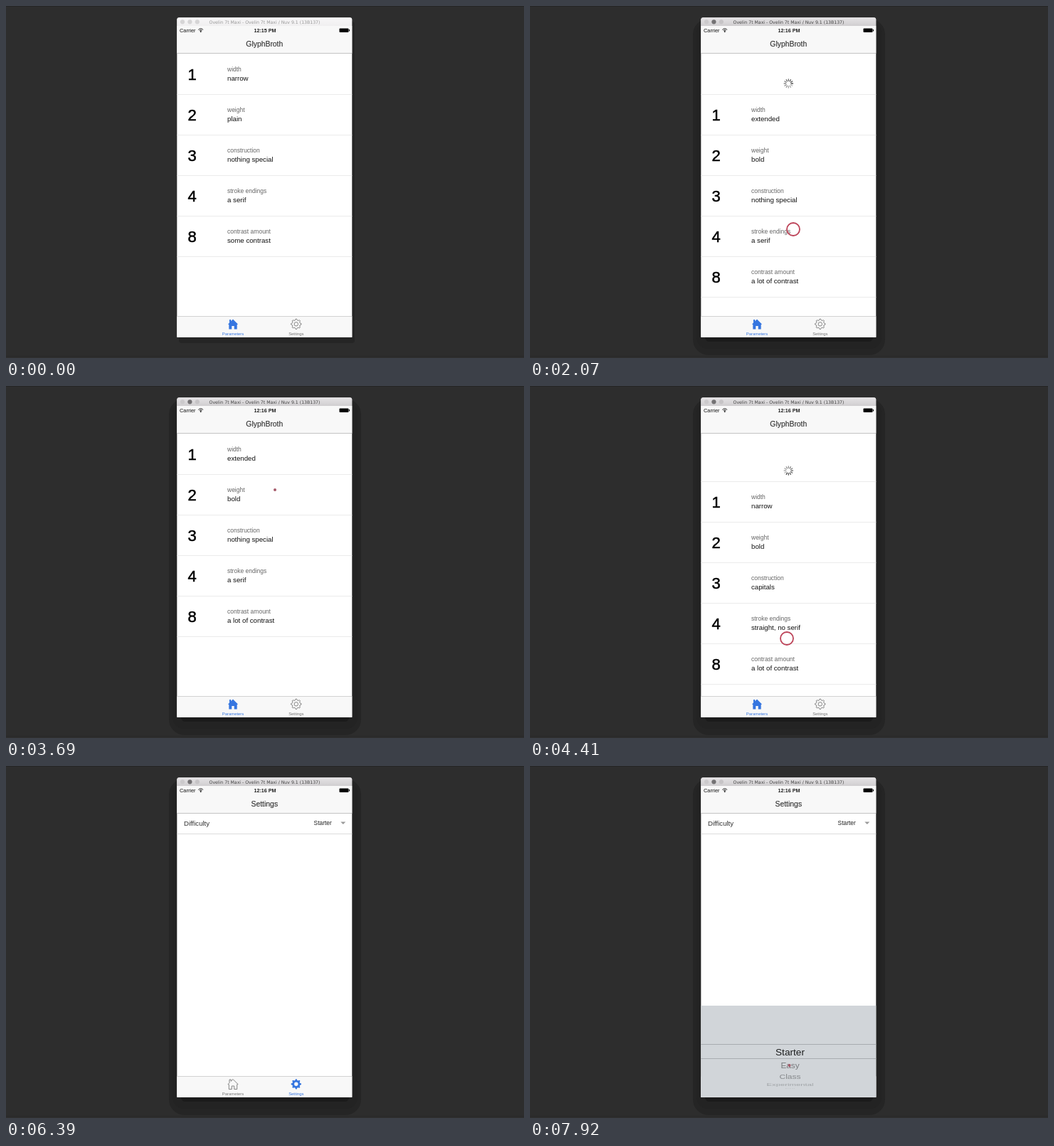
An HTML page with a canvas that plays this animation: 728 px wide and 495 px high, repeating every 8000 ms.

```html
<!DOCTYPE html>
<html lang="en">
<head>
<meta charset="utf-8">
<title>Type parameters app</title>
<style>
html, body { margin: 0; width: 100%; height: 100%; overflow: hidden; background: #2d2d2d; }
canvas { display: block; width: 728px; height: 495px; }
</style>
</head>
<body>
<canvas id="stage" width="728" height="495"></canvas>
<script>
const ctx = document.getElementById('stage').getContext('2d');
const LOOP = 8000, STEP = 90;
const SANS = '"Liberation Sans", Arial, sans-serif';
const BLUE = '#3676e0', GREY = '#777', RULE = '#ebebeb';
const WIN = { x: 240.3, y: 16.3, w: 246, h: 449.4 };
const DEVICE = 'Ovelin 7t Maxi';
const APP = 'GlyphBroth';

const NUMBERS = [1, 2, 3, 4, 8];
const LABELS = ['width', 'weight', 'construction', 'stroke endings', 'contrast amount'];
const RECIPES = [
  ['narrow', 'plain', 'nothing special', 'a serif', 'some contrast'],
  ['extended', 'bold', 'nothing special', 'a serif', 'a lot of contrast'],
  ['narrow', 'bold', 'capitals', 'straight, no serif', 'a lot of contrast']
];

// A pull drags in two moves with a rest between them, then lets go.
const PULLS = [
  { down: 1080, rest: 1620, resume: 1710, up: 2070, back: 2613, from: [354, 135], mid: [366, 268], to: [370, 314] },
  { down: 3600, rest: 3960, resume: 4140, up: 4410, back: 4915, from: [378, 146], mid: [370, 296], to: [361, 355] }
];
const TAPS = [
  { down: 5580, up: 5850, at: [408, 452] },
  { down: 6750, up: 6930, at: [450, 76] }
];
const ACTIVATE = 270, SETTINGS = 5850, PICKER = 6980, LAST_PRESS = 7830;
const HOLD = 36;

const clamp = v => Math.min(1, Math.max(0, v));
const lerp = (a, b, p) => a + (b - a) * p;
const span = (t, a, b) => clamp((t - a) / (b - a));
const easeOut = p => 1 - (1 - p) ** 3;
const easeInOut = p => p * p * (3 - 2 * p);

function rect(x, y, w, h, color) {
  ctx.fillStyle = color;
  ctx.fillRect(x, y, w, h);
}

function round(x, y, w, h, r, color) {
  ctx.fillStyle = color;
  ctx.beginPath();
  ctx.roundRect(x, y, w, h, r);
  ctx.fill();
}

function disc(x, y, r, color) {
  ctx.fillStyle = color;
  ctx.beginPath();
  ctx.arc(x, y, r, 0, Math.PI * 2);
  ctx.fill();
}

function text(s, x, y, size, color, { align = 'left', weight = 'normal', stroke = 0, font = SANS } = {}) {
  ctx.font = `${weight} ${size}px ${font}`;
  ctx.textAlign = align;
  ctx.fillStyle = color;
  ctx.fillText(s, x, y);
  if (stroke) {
    ctx.strokeStyle = color;
    ctx.lineWidth = stroke;
    ctx.strokeText(s, x, y);
  }
}

function dragPoint(p, t) {
  const a = easeInOut(span(t, p.down + STEP, p.rest));
  const b = easeInOut(span(t, p.resume, p.up));
  return [0, 1].map(i => lerp(lerp(p.from[i], p.mid[i], a), p.to[i], b));
}

function listOffset(t) {
  for (const p of PULLS) {
    if (t < p.down || t > p.back + 250) continue;
    const drag = Math.max(0, (dragPoint(p, t)[1] - p.from[1] - 8) / 3);
    const held = lerp(drag, HOLD, easeOut(span(t, p.up, p.up + 250)));
    return held * (1 - easeOut(span(t, p.back, p.back + 250)));
  }
  return 0;
}

function drawBackdrop(active) {
  rect(0, 0, 728, 495, '#2d2d2d');
  rect(0, 0, 728, 1, '#242424');
  rect(0, 492, 728, 1, '#282828');
  if (active) {
    round(229, 18, 270, 473, 22, '#252525');
    round(234, 22, 260, 460, 16, '#232323');
    round(246, 440, 236, 32, 6, '#1b1b1b');
  } else {
    round(243, 22, 247, 452, 4, '#252525');
  }
}

function drawTitleBar(active) {
  const g = ctx.createLinearGradient(0, 16, 0, 28);
  g.addColorStop(0, active ? '#e6e4e6' : '#f8f7f8');
  g.addColorStop(1, active ? '#d0ced0' : '#f0eff0');
  rect(WIN.x, WIN.y, WIN.w, 12, g);
  const dots = active ? ['#cbc9cb', '#747274', '#c6c4c6'] : ['#d6d5d6', '#d6d5d6', '#d6d5d6'];
  dots.forEach((c, i) => disc(248 + 10.4 * i, 22.3, 3.1, c));
  text(`${DEVICE} - ${DEVICE} / Nuv 9.1 (13B137)`, 363.5, 24.8, 6.2, active ? '#444' : '#999',
    { align: 'center', font: '"DejaVu Sans", sans-serif' });
}

function drawHeader(title, active) {
  rect(240, 28, 247, 38, '#f8f8f8');
  rect(240, 66, 247, 1, '#c4c4c4');
  text('Carrier', 244, 36.8, 7.4, '#111');
  ctx.strokeStyle = '#111';
  ctx.lineWidth = 1;
  for (const r of [2.4, 4.5]) {
    ctx.beginPath();
    ctx.arc(273.7, 36.4, r, -Math.PI * .77, -Math.PI * .23);
    ctx.stroke();
  }
  disc(273.7, 36, .9, '#111');
  text(active ? '12:16 PM' : '12:15 PM', 364, 36.9, 7.2, '#222', { align: 'center', weight: 'bold' });
  round(468.5, 31.5, 13, 5.6, 1, '#000');
  rect(482, 33, 1, 2.5, '#000');
  text(title, 363.3, 57, 10.4, '#333', { align: 'center', stroke: .15 });
}

function drawSpinner(x, y, t) {
  const head = Math.floor(t / 1000 * 12);
  ctx.lineWidth = 1.3;
  ctx.lineCap = 'round';
  for (let i = 0; i < 12; i++) {
    const a = i * Math.PI / 6, age = ((head - i) % 12 + 12) % 12;
    ctx.strokeStyle = `rgba(70,70,70,${.95 - age * .05})`;
    ctx.beginPath();
    ctx.moveTo(x + Math.cos(a) * 3.6, y + Math.sin(a) * 3.6);
    ctx.lineTo(x + Math.cos(a) * 6.2, y + Math.sin(a) * 6.2);
    ctx.stroke();
  }
  ctx.lineCap = 'butt';
}

function drawList(t) {
  const off = Math.round(listOffset(t));
  const recipe = RECIPES[PULLS.filter(p => t >= p.up).length];
  if (PULLS.some(p => t >= p.up && t < p.back)) drawSpinner(363.3, off + 52, t);
  for (let i = 0; i <= 5; i++) {
    const y = 67 + off + 57 * i;
    if (i || off) rect(240, y, 247, 1, RULE);
    if (i === 5) break;
    text(NUMBERS[i], 255.5, y + 36.6, 22, '#000', { stroke: .5 });
    text(LABELS[i], 311, y + 24.7, 8.5, '#666');
    text(recipe[i], 311, y + 37.6, 9.7, '#111');
  }
}

function drawSettings() {
  text('Difficulty', 250, 84.2, 9.6, '#333');
  text('Starter', 432.6, 83.4, 8.4, '#222');
  ctx.fillStyle = '#999';
  ctx.beginPath();
  ctx.moveTo(470.3, 78.4);
  ctx.lineTo(477.3, 78.4);
  ctx.lineTo(473.8, 82);
  ctx.fill();
  rect(240, 95, 247, 1, '#dcdcdc');
}

function drawHome(x, y, on) {
  ctx.beginPath();
  [[0, -7], [7, 0], [5.7, .4], [5.7, 7], [1.7, 7], [1.7, 2.5], [-1.7, 2.5], [-1.7, 7],
    [-5.7, 7], [-5.7, .4], [-7, 0], [-5, -2], [-5, -6.5], [-2.8, -6.5], [-2.8, -4.2]]
    .forEach(([a, b]) => ctx.lineTo(x + a, y + b));
  ctx.closePath();
  paintIcon(on);
}

function drawGear(x, y, on) {
  ctx.beginPath();
  for (let i = 0; i < 32; i++) {
    const r = i % 4 < 2 ? 7.2 : 5.5, a = (i - .5) * Math.PI / 16;
    ctx.lineTo(x + Math.cos(a) * r, y + Math.sin(a) * r);
  }
  ctx.closePath();
  ctx.moveTo(x + 2.7, y);
  ctx.arc(x, y, 2.7, 0, Math.PI * 2);
  paintIcon(on);
}

function paintIcon(on) {
  ctx.fillStyle = BLUE;
  ctx.strokeStyle = GREY;
  ctx.lineWidth = .9;
  if (on) ctx.fill('evenodd');
  else ctx.stroke();
}

function drawTabs(settings) {
  rect(240, 437, 247, 29, '#f8f8f8');
  rect(240, 436, 247, 1, '#d2d2d2');
  drawHome(319, 447.5, !settings);
  drawGear(407.8, 447.3, settings);
  text('Parameters', 319, 463, 5.9, settings ? GREY : BLUE, { align: 'center' });
  text('Settings', 407.8, 463, 5.9, settings ? BLUE : GREY, { align: 'center' });
}

function wheelItem(s, y, size, squash, color) {
  ctx.save();
  ctx.translate(365.5, y);
  ctx.scale(1, squash);
  text(s, 0, size * .35, size, color, { align: 'center' });
  ctx.restore();
}

function drawPicker(t) {
  const p = easeOut(span(t, PICKER, PICKER + 420));
  if (!p) return;
  ctx.save();
  ctx.translate(0, Math.round(129 * (1 - p)));
  rect(240, 337, 247, 129, '#d1d5d9');
  rect(240, 391, 247, 1, '#a8acb0');
  rect(240, 411, 247, 1, '#a8acb0');
  wheelItem('Starter', 402, 13.7, 1, '#1c1d1e');
  wheelItem('Easy', 421, 11.8, .95, '#777a7d');
  wheelItem('Class', 436.5, 12, .72, '#85888b');
  wheelItem('Experimental', 448, 11.3, .48, '#a0a4a7');
  wheelItem('Pro', 454, 9, .15, '#bcc0c4');
  ctx.restore();
}

// Starts as a dot, opens into a ring, then widens and fades on release.
function drawTouch([x, y], t, down, up) {
  if (t < down || t >= up + 270) return;
  if (t - down <= STEP) return disc(x, y, 2, '#a65a6a');
  const out = span(t, up, up + 270);
  ctx.globalAlpha = 1 - out;
  ctx.strokeStyle = '#bd4459';
  ctx.lineWidth = 1.8;
  ctx.beginPath();
  ctx.arc(x, y, lerp(lerp(2, 9, span(t, down, down + 180)), 15, out), 0, Math.PI * 2);
  ctx.stroke();
  ctx.globalAlpha = 1;
}

function draw(t) {
  const active = t >= ACTIVATE, settings = t >= SETTINGS;
  drawBackdrop(active);
  ctx.save();
  ctx.beginPath();
  ctx.roundRect(WIN.x, WIN.y, WIN.w, WIN.h, [3, 3, 0, 0]);
  ctx.clip();
  rect(240, 16, 247, 450, '#fff');
  if (settings) drawSettings();
  else drawList(t);
  drawTitleBar(active);
  drawHeader(settings ? 'Settings' : APP, active);
  drawTabs(settings);
  drawPicker(t);
  ctx.restore();
  for (const p of PULLS) drawTouch(dragPoint(p, t), t, p.down, p.up);
  for (const p of TAPS) drawTouch(p.at, t, p.down, p.up);
  drawTouch([364.5, lerp(425.5, 421, span(t, LAST_PRESS, LAST_PRESS + STEP))], t, LAST_PRESS, LOOP);
}

const start = performance.now();
function tick() {
  const t = (performance.now() - start) % LOOP;
  draw(Math.floor(t / STEP) * STEP);
  requestAnimationFrame(tick);
}
tick();
</script>
</body>
</html>
```
